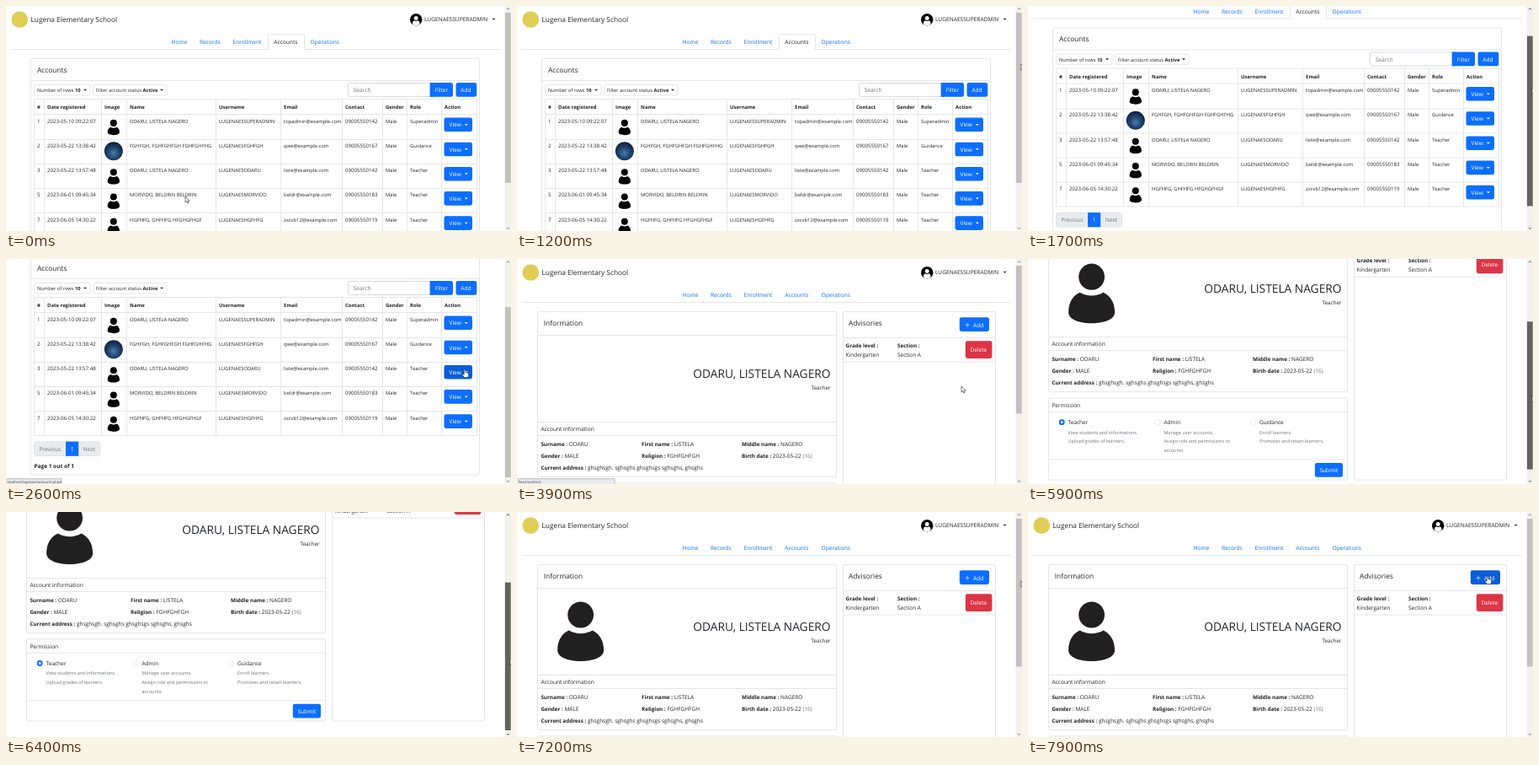
These frames come from a looping animation (600x267 px, 8 s). An HTML page:

```html
<!DOCTYPE html>
<html lang="en">
<head>
<meta charset="utf-8">
<title>Accounts</title>
<style>
html, body { margin: 0; width: 100%; height: 100%; overflow: hidden; background: #fff; }
svg { display: block; width: 100vw; height: 100vh; font-family: "Open Sans", "Noto Sans", sans-serif; text-rendering: geometricPrecision; }
text { white-space: pre; }
</style>
</head>
<body>
<svg id="stage" viewBox="0 0 600 267"></svg>
<script>
const INK = '#212529', BLUE = '#0d6efd', DARK_BLUE = '#0b5ed7', GREY = '#6c757d', LINE = '#e3e6e9';
const LOOP = 8000, STEP = 100, VIEW_H = 267, TRACK_TOP = 8, TRACK_H = 251;
const stage = document.getElementById('stage');

function el(parent, tag, attrs = {}, content) {
  const node = document.createElementNS('http://www.w3.org/2000/svg', tag);
  for (const k in attrs) node.setAttribute(k, attrs[k]);
  if (content !== undefined) node.textContent = content;
  parent.appendChild(node);
  return node;
}
const group = (p, attrs) => el(p, 'g', attrs);
const text = (p, x, y, s, size = 6.64, fill = INK, more = {}) =>
  el(p, 'text', { x, y, 'font-size': size, fill, ...more }, s);
const bold = (p, x, y, s, size) => text(p, x, y, s, size, INK, { 'font-weight': 700 });
const rect = (p, x, y, w, h, fill, rx = 0, stroke = 'none') =>
  el(p, 'rect', { x, y, width: w, height: h, fill, rx, stroke });
const path = (p, d, fill, more = {}) => el(p, 'path', { d, fill, ...more });
const rule = (p, d) => path(p, d, 'none', { stroke: LINE });
const circle = (p, cx, cy, r, fill, more = {}) => el(p, 'circle', { cx, cy, r, fill, ...more });
const caret = (p, x, y, fill = INK) => path(p, `M${x - 2} ${y - 1}h4l-2 2z`, fill);
const card = (p, x, y, w, h) => rect(p, x, y, w, h, '#fff', 1.5, LINE);

function person(p, x, y, k, fill) {
  const g = group(p, { transform: `translate(${x} ${y}) scale(${k})`, fill });
  el(g, 'ellipse', { cx: 0, cy: -20, rx: 15.4, ry: 15.6 });
  el(g, 'path', { d: 'M-27.5 22C-27.5 8-20 1-14-1.5Q0 6 14-1.5C21 2 27.5 9 27.5 22C27.5 30 16 35 0 35S-27.5 30-27.5 22Z' });
}

// Bold label followed by its value
function field(p, x, y, label, value, extra = '') {
  const t = text(p, x, y, '', 6.5);
  el(t, 'tspan', { 'font-weight': 700, 'font-size': 6.3 }, label + ' : ');
  el(t, 'tspan', {}, value);
  if (extra) el(t, 'tspan', { fill: GREY }, extra);
}

function header(p, active) {
  circle(p, 16.2, 16, 9.8, '#e0cd55');
  text(p, 29.5, 18.7, 'Lugena Elementary School', 8.33);
  circle(p, 487.2, 16.2, 7.2, '#000');
  person(p, 487.2, 17.6, 0.16, '#fff');
  text(p, 497, 18.4, 'LUGENAESSUPERADMIN');
  caret(p, 579.6, 15.8);
  rule(p, 'M6 51.5H587');
  if (active) {
    path(p, 'M311.5 52V35.5q0-2 2-2h39q2 0 2 2V52', '#fff', { stroke: LINE });
  }
  const tabs = { Home: 196.5, Records: 230, Enrollment: 269.5, Accounts: 318.3, Operations: 361.5 };
  for (const name in tabs) text(p, tabs[name], 45.4, name, 6.64, name === active ? INK : BLUE);
}

const buttons = [];
function button(p, x, y, w, h, fill = BLUE, hover = DARK_BLUE, link = false) {
  const node = rect(p, x, y, w, h, fill, 2.4);
  buttons.push({ node, page: p, x, y, w, h, fill, hover, link });
}

function dropdown(p, x, w, label, value) {
  rect(p, x + .5, 93.5, w, 12.5, '#fff', 2, LINE);
  const t = text(p, x + 4, 102, label + ' ', 5.75);
  el(t, 'tspan', { 'font-weight': 700 }, value);
  caret(p, x + w - 5.5, 99.8);
}

function listPage() {
  const p = group(stage);
  header(p, 'Accounts');
  card(p, 29.5, 62.5, 533, 258.5);
  rule(p, 'M29.5 88.5H562.5');
  text(p, 37, 78.7, 'Accounts', 8.33);
  dropdown(p, 33, 66.5, 'Number of rows', '10');
  dropdown(p, 103, 87.5, 'Filter account status', 'Active');
  rect(p, 406.5, 91.5, 100, 16, '#fff', 2.4, '#d5dade');
  text(p, 412.7, 102.1, 'Search', 6.64, GREY);
  button(p, 504, 91, 27, 16.8);
  rect(p, 503.6, 91, 4, 16.8, BLUE);
  text(p, 509.8, 102, 'Filter', 6.5, '#fff');
  button(p, 534.5, 91, 24.8, 16.8);
  text(p, 540.3, 102, 'Add', 6.64, '#fff');

  const edges = [33.5, 45.5, 113.5, 143.5, 249.5, 326.5, 399.5, 447.5, 476.5, 517.5, 559.5];
  const rowY = i => 128.9 + 29.2 * i;
  const heads = ['#', 'Date registered', 'Image', 'Name', 'Username', 'Email', 'Contact', 'Gender', 'Role', 'Action'];
  edges.forEach(x => rule(p, `M${x} 110.5V274.5`));
  rule(p, 'M33.5 110.5H559.5');
  heads.forEach((h, i) => bold(p, edges[i] + 3.6, 122, h, 5.9));
  const rows = [
    ['1', '2023-05-10 09:22:07', 'ODARU, LISTELA NAGERO', 'SUPERADMIN', 'topadmin@example.com', '09005550142', 'Superadmin'],
    ['2', '2023-05-22 13:38:42', 'FGHFGH, FGHFGHFGH FGHFGHFHG', 'FGHFGH', 'qwe@example.com', '09005550167', 'Guidance'],
    ['3', '2023-05-22 13:57:48', 'ODARU, LISTELA NAGERO', 'ODARU', 'liste@example.com', '09005550142', 'Teacher'],
    ['5', '2023-06-01 09:45:34', 'MORVIDO, BELDRIN BELDRIN', 'MORVIDO', 'beldr@example.com', '09005550183', 'Teacher'],
    ['7', '2023-06-05 14:30:22', 'HGFHFG, GHFHFG HFGHGFHGF', 'HGFHFG', 'zxcvb12@example.com', '09005550119', 'Teacher']
  ];
  rule(p, 'M33.5 128.5H559.5');
  rows.forEach(([id, date, name, user, mail, phone, role], i) => {
    const y = rowY(i), base = y + 9.8;
    rule(p, `M33.5 ${Math.floor(rowY(i + 1)) + .5}H559.5`);
    const cells = [id, date, '', name, 'LUGENAES' + user, mail, phone, 'Male', role];
    cells.forEach((s, c) => text(p, edges[c] + 3.6, base, s, /^\d/.test(s) ? 6.1 : 5.85));
    if (i === 1) circle(p, 127.8, y + 14.2, 11, 'url(#photo)');
    else person(p, 127.8, y + 15.2, 0.26, '#000');
    button(p, 520.5, y + 3.6, 33.5, 16.6, BLUE, DARK_BLUE, true);
    text(p, 526.5, y + 14.4, 'View', 6.64, '#fff');
    caret(p, 546.8, y + 12, '#fff');
  });

  rect(p, 33.5, 282, 78, 16.6, '#e9ecef', 2.4, '#dee2e6');
  rect(p, 71, 281.6, 15.2, 17.2, BLUE);
  text(p, 39.4, 292.7, 'Previous', 6.5, GREY);
  text(p, 76.7, 292.7, '1', 6.64, '#fff');
  text(p, 91.6, 292.7, 'Next', 6.64, GREY);
  bold(p, 33.5, 313.4, 'Page 1 out of 1', 6.5);
  return p;
}

function permission(p, x, label, lines, on) {
  if (on) {
    circle(p, x, 294.5, 3.4, BLUE);
    circle(p, x, 294.5, 1.4, '#fff');
  } else circle(p, x, 294.5, 3.1, '#fff', { stroke: '#dcdfe2', 'stroke-width': .6 });
  text(p, x + 7.4, 297, label, 6.5);
  lines.forEach((s, i) => text(p, x + 7.4, 308.4 + 10.6 * i, s, 5.5, GREY));
}

function profilePage() {
  const p = group(stage);
  header(p);
  card(p, 24.5, 62.5, 355, 196);
  rule(p, 'M24.5 90.5H379.5M24.5 193.5H379.5M24.5 209.5H379.5');
  text(p, 31.8, 78.8, 'Information', 8.33);
  p.avatar = group(p);
  person(p.avatar, 75.6, 142, 1, '#211f20');
  const right = { 'text-anchor': 'end' };
  text(p, 372.5, 140.8, 'ODARU, LISTELA NAGERO', 13.75, INK, right);
  text(p, 372.5, 154.8, 'Teacher', 6.3, INK, right);
  text(p, 28.4, 203.6, 'Account information');
  field(p, 28.4, 222.2, 'Surname', 'ODARU');
  field(p, 148, 222.2, 'First name', 'LISTELA');
  field(p, 267, 222.2, 'Middle name', 'NAGERO');
  field(p, 28.4, 236.2, 'Gender', 'MALE');
  field(p, 148, 236.2, 'Religion', 'FGHFGHFGH');
  field(p, 267, 236.2, 'Birth date', '2023-05-22', ' (16)');
  field(p, 28.4, 250.2, 'Current address', 'ghsghsgh. sghsghs ghsghsgs sghsghs, ghsghs');

  card(p, 24.5, 265.8, 355, 97.2);
  rule(p, 'M24.5 282.2H379.5M24.5 338.8H379.5');
  text(p, 28.4, 276.6, 'Permission', 6.5);
  permission(p, 40.2, 'Teacher', ['View students and informations.', 'Upload grades of learners.'], true);
  permission(p, 154, 'Admin', ['Manage user accounts.', 'Assign role and permissions to', 'accounts.']);
  permission(p, 267.6, 'Guidance', ['Enroll learners.', 'Promotes and retain learners.']);
  button(p, 340.8, 342.8, 33.2, 16.8);
  text(p, 346.4, 353.8, 'Submit', 6.64, '#fff');

  card(p, 387.5, 62.5, 181, 300.5);
  rule(p, 'M387.5 93.5H568.5M387.5 122H568.5');
  text(p, 394, 79.3, 'Advisories', 8.33);
  button(p, 525.8, 69.2, 35.2, 16.8);
  path(p, 'M532.5 78.2h5M535 75.7v5', 'none', { stroke: '#fff', 'stroke-width': .6 });
  text(p, 542, 80.7, 'Add', 6.64, '#fff');
  bold(p, 390.6, 105.2, 'Grade level :', 6.3);
  bold(p, 452, 105.2, 'Section :', 6.3);
  text(p, 390.6, 115.8, 'Kindergarten', 6.5);
  text(p, 452, 115.8, 'Section A', 6.5);
  button(p, 532.8, 97.2, 31.6, 20.8, '#dc3545', '#bb2d3b');
  text(p, 538.5, 110.2, 'Delete', 6.5, '#fff');
  return p;
}

const defs = el(stage, 'defs');
const photo = el(defs, 'radialGradient', { id: 'photo', cx: .5, cy: .6, r: .6 });
[[0, '#4a7fa0'], [.45, '#234a78'], [1, '#101c38']].forEach(([offset, color]) =>
  el(photo, 'stop', { offset, 'stop-color': color }));

const list = listPage(), profile = profilePage();

rect(stage, 592.6, 0, 7.4, VIEW_H, '#f1f1f1');
const arrows = path(stage, 'M594.9 4.2l1.6-1.6 1.6 1.6M594.9 263l1.6 1.6 1.6-1.6', 'none', { stroke: '#606060', 'stroke-width': .9 });
const thumb = rect(stage, 592.9, TRACK_TOP, 6.8, 100, '#c1c1c1');

const status = group(stage);
const statusBox = rect(status, -1, 260.8, 67, 8, '#e9eaec', 0, '#b9bcc0');
const statusText = text(status, 1.6, 266.4, '', 4, '#444');

const pointer = group(stage, { stroke: '#222', 'stroke-width': .6, 'stroke-linejoin': 'round' });
const arrow = path(pointer, 'M0 0V7.2L1.7 5.7 2.8 8.2 4 7.7 2.9 5.2H5.1Z', '#fff');
const hand = path(pointer, 'M-.8.6Q0-.4.8.6V3.6L4 4.3Q4.8 4.6 4.7 5.6L4 9.6H-.4L-3 6.2Q-3 5-1.8 5.4L-.8 6.2Z', '#fff');

const scrollKeys = [[0, 0], [1300, 0], [1700, 36.5], [1850, 65], [3599, 65], [3600, 0], [5000, 0],
  [5200, 22.5], [6000, 112], [6200, 115], [6600, 115], [7150, 0], [LOOP, 0]];
const pointerKeys = [[0, 213, 226], [200, 213, 226], [1000, 599, 69], [1300, 599, 69], [1700, 599, 97],
  [1850, 599, 119], [2000, 599, 119], [2500, 545, 131], [2800, 545, 131], [3200, 528, 151], [4200, 528, 151],
  [4900, 599, 82], [5000, 599, 82], [5200, 599, 97], [6000, 599, 172], [6200, 599, 174], [6600, 599, 174],
  [7150, 599, 82], [7300, 599, 82], [7800, 546, 76], [LOOP, 546, 76]];

function at(keys, t, c = 1) {
  const i = Math.max(1, keys.findIndex(k => k[0] >= t));
  const a = keys[i - 1], b = keys[i];
  return a[c] + (b[c] - a[c]) * (t - a[0]) / (b[0] - a[0]);
}
const show = (node, on) => node.setAttribute('visibility', on ? 'inherit' : 'hidden');

function draw(t) {
  const first = t < 3600, page = first ? list : profile;
  const scroll = at(scrollKeys, t), x = at(pointerKeys, t, 1), y = at(pointerKeys, t, 2);
  const docH = first ? 332 : 382;
  const dragging = (t >= 1300 && t < 1950) || (t >= 5000 && t < 7200);
  show(list, first);
  show(profile, !first);
  show(profile.avatar, !first && t >= 4000);
  page.setAttribute('transform', `translate(0 ${-scroll})`);

  let over = null;
  for (const b of buttons) {
    const inside = b.page === page && x >= b.x && x <= b.x + b.w && y + scroll >= b.y && y + scroll <= b.y + b.h;
    if (inside) over = b;
    b.node.setAttribute('fill', inside ? b.hover : b.fill);
  }
  pointer.setAttribute('transform', `translate(${x} ${y})`);
  show(arrow, !over);
  show(hand, over);

  thumb.setAttribute('y', TRACK_TOP + scroll * TRACK_H / docH);
  thumb.setAttribute('height', TRACK_H * VIEW_H / docH);
  thumb.setAttribute('fill', dragging ? '#636363' : '#c1c1c1');
  arrows.setAttribute('stroke', dragging ? '#404040' : '#707070');

  const loading = t >= 3900 && t < 4000;
  show(status, loading || (over && over.link));
  statusBox.setAttribute('width', loading ? 117 : 67);
  statusText.textContent = loading ? 'Read localhost' : 'localhost/lugenaes/accounts.php#';
}

const start = performance.now();
function tick() {
  const t = (performance.now() - start) % LOOP;
  draw(Math.floor(t / STEP) * STEP);
  requestAnimationFrame(tick);
}
tick();
</script>
</body>
</html>
```
